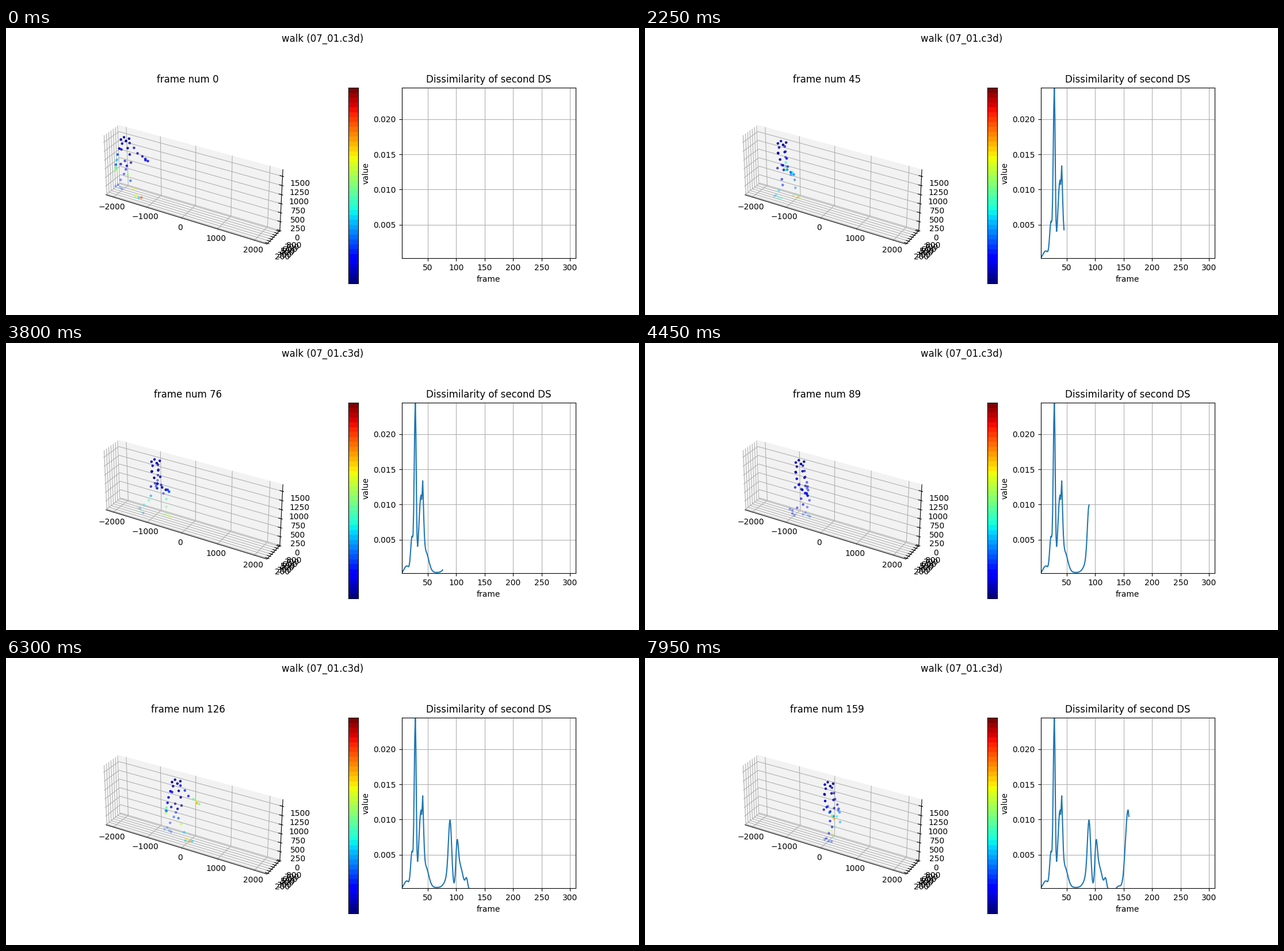
Animation of 1100 by 500 pixels, one loop 8000 ms. Source, as a matplotlib script:

```python
from itertools import product

import numpy as np
import matplotlib.pyplot as plt
from matplotlib.animation import FuncAnimation
from matplotlib.collections import LineCollection, PolyCollection

W, H, DPI = 1100, 500, 100
FRAMES, INTERVAL = 160, 50
PERIOD = 126            # frames per gait cycle
SPEED = 11.35           # mm per frame
JET = plt.get_cmap("jet", 40)

fig = plt.figure(figsize=(W / DPI, H / DPI), dpi=DPI, facecolor="white")


def add_axes(x, y, w, h):
    """Axes placed by its top-left corner and size in pixels."""
    return fig.add_axes([x / W, 1 - (y + h) / H, w / W, h / H])


# ---------- perspective view ----------
CENTER = np.array([51, 500, 843])
HALF = np.array([2280, 345, 843])
SCALE = 0.388e-3
elev, azim = np.radians(30), np.radians(-60)
EYE = np.array([np.cos(elev) * np.cos(azim), np.cos(elev) * np.sin(azim), np.sin(elev)])
RIGHT = np.array([-np.sin(azim), np.cos(azim), 0])
UP = np.cross(EYE, RIGHT)


def project(points):
    """World millimetres to stage pixels, plus nearness to the viewer."""
    b = (np.asarray(points, float) - CENTER) * SCALE
    near = b @ EYE
    k = 1843 / (10 - near)
    return np.stack([320.5 + k * (b @ RIGHT), 269.4 - k * (b @ UP)], -1), near


def path(*points):
    return project(points)[0]


view = add_axes(0, 0, W, H)
view.set(xlim=(0, W), ylim=(H, 0))
view.axis("off")

(x0, y0, z0), (x1, y1, z1) = CENTER - HALF, CENTER + HALF
panes = [
    path((x0, y0, z0), (x0, y1, z0), (x0, y1, z1), (x0, y0, z1)),
    path((x0, y1, z0), (x1, y1, z0), (x1, y1, z1), (x0, y1, z1)),
    path((x0, y0, z0), (x1, y0, z0), (x1, y1, z0), (x0, y1, z0)),
]
view.add_collection(PolyCollection(
    panes, facecolors=["0.975", "0.95", "0.9625"], edgecolors="none", zorder=1))

xticks = range(-2000, 2001, 1000)
yticks = range(200, 801, 100)
zticks = range(0, 1501, 250)
grid = [path((v, y0, z0), (v, y1, z0), (v, y1, z1)) for v in xticks]
grid += [path((x1, v, z0), (x0, v, z0), (x0, v, z1)) for v in yticks]
grid += [path((x0, y0, v), (x0, y1, v), (x1, y1, v)) for v in zticks]
view.add_collection(LineCollection(grid, colors="#b0b0b0", linewidths=0.8, zorder=2))

tx, ty = HALF[0] / 6, HALF[1] / 6
black = [path((x0, y0, z0), (x1, y0, z0), (x1, y1, z0), (x1, y1, z1))]
black += [path((v, y0 + 0.2 * ty, z0), (v, y0 - 0.1 * ty, z0)) for v in xticks]
black += [path((x1 - 0.2 * tx, v, z0), (x1 + 0.1 * tx, v, z0)) for v in yticks]
black += [path((x1 - 0.2 * tx, y1, v), (x1 + 0.1 * tx, y1, v)) for v in zticks]
view.add_collection(LineCollection(black, colors="black", linewidths=0.8, zorder=3))


def tick_labels(values, place, dx, dy):
    for v in values:
        px, py = path(place(v))[0]
        view.text(px + dx, py + dy, str(v).replace("-", "\u2212"),
                  ha="center", va="center", fontsize=10)


tick_labels(xticks, lambda v: (v, y0, z0), -2.5, 17)
tick_labels(yticks, lambda v: (x1, v, z0), 25.5, 24.5)
tick_labels(zticks, lambda v: (x1, y1, v), 30, 13)

fig.suptitle("walk (07_01.c3d)")
title = view.text(316.1, 94.9, "", ha="center", va="baseline", fontsize=12)
dots = view.scatter([], [], s=10.5, linewidths=0, zorder=4)

# ---------- walking figure ----------
HEAD = list(product((75, -75), (70, -70), (1557,)))
CHEST = [(-90, 0, 1407), (70, 0, 1322), (-120, 0, 1235), (125, 0, 1157)]
PELVIS = list(product((90, -90), (95, -95), (870,)))
TRUNK = np.array(HEAD + CHEST + PELVIS)


def swing(angle):
    """Unit vector hanging down, swung forward by an angle in degrees."""
    a = np.radians(angle)
    return np.array([np.sin(a), 0, -np.cos(a)])


def pulse(phase, at, width):
    """Smooth bump that repeats once per gait cycle."""
    d = (phase - at + PERIOD / 2) % PERIOD - PERIOD / 2
    return np.exp(-0.5 * (d / width) ** 2)


def arm(side, t):
    c = side * np.cos(2 * np.pi * t / PERIOD)
    upper, fore = 325 * swing(13.5 + 24.5 * c), 300 * swing(29 + 42 * c)
    shoulder = np.array([-22 + 32 * c, side * 185, 1364])
    out = np.array([0, side * 40, 0])
    elbow = shoulder + upper + out
    return [shoulder, shoulder + 0.5 * upper + out, elbow, elbow + 0.5 * fore,
            elbow + 0.85 * fore - 0.5 * out, elbow + 0.95 * fore - 1.5 * out,
            elbow + 1.15 * fore - out]


def bend_knee(hip, ankle, thigh=405, shank=410):
    d = ankle - hip
    reach = np.linalg.norm(d)
    d = d / reach
    reach = min(reach, thigh + shank - 1)
    m = (thigh ** 2 - shank ** 2 + reach ** 2) / (2 * reach)
    bend = np.sqrt(max(0, thigh ** 2 - m ** 2))
    return hip + m * d + bend * np.array([-d[2], 0, d[0]])


def leg(side, t):
    phase = (t if side < 0 else t + PERIOD / 2) % PERIOD
    s = np.clip((phase - 72) / 50, 0, 1)
    stride = SPEED * PERIOD * s * s * (3 - 2 * s)
    pitch = 50 * pulse(phase, 86, 11) - 14 * pulse(phase, 123, 7)
    along, normal = swing(90 - pitch) * [1, 1, -1], -swing(-pitch)
    along[2] = -np.sin(np.radians(pitch))
    lift = 35 * np.sin(np.pi * s) + 195 * max(0, along[2])
    toe = np.array([500 - SPEED * phase + stride, side * 95, 25 + lift])
    heel = toe - 195 * along
    ankle = heel + 60 * along + 60 * normal
    hip = np.array([10, side * 95, 840])
    knee = bend_knee(hip, ankle)
    out = np.array([0, side * 20, 0])
    return [hip + 0.6 * (knee - hip) + out, knee + out,
            ankle + 0.45 * (knee - ankle) + out, ankle + out,
            heel, toe - 68 * along + out, toe]


def pose(t):
    p = np.vstack([TRUNK, arm(1, t), arm(-1, t), leg(1, t), leg(-1, t)])
    bob = 12 * (1 - np.cos(4 * np.pi * t / PERIOD))
    return p + np.array([-1810 + SPEED * t, 489 + 0.55 * t, bob])


# ---------- marker values: calm trunk, limbs livelier towards their ends ----------
ARM_GAIN, LEG_GAIN = np.linspace(0.15, 1.1, 7), np.linspace(0.7, 1.1, 7)
LIMBS = [(ARM_GAIN, 45, 81), (ARM_GAIN, 138, 126), (LEG_GAIN, 50, 126), (LEG_GAIN, 0, 63)]
COUNT = len(TRUNK) + 28
rng = np.random.default_rng(7)
SHIFT = rng.uniform(0, 2 * np.pi, COUNT)
RATE = rng.uniform(0.1, 0.3, COUNT)


def values(t):
    parts = [np.full(len(TRUNK), 0.05)]
    for gain, peak, period in LIMBS:
        parts.append(gain * (0.34 + 0.2 * np.cos(2 * np.pi * (t - peak) / period)))
    return np.clip(np.concatenate(parts) * (1 + 0.45 * np.sin(SHIFT + RATE * t)), 0, 1)


# ---------- colour bar ----------
bar = add_axes(595.3, 104, 17.05, 341)
bar.pcolormesh([0, 1], np.linspace(0, 1, JET.N + 1), np.arange(JET.N)[:, None], cmap=JET)
bar.set(xticks=[], yticks=[])

# ---------- dissimilarity chart ----------
# each bump: centre, height, width before and after the centre
BUMPS = [(13, 1.2, 5, 4), (22, 5, 2.3, 1.6), (28, 24, 2, 1.5), (38, 11, 3.8, 2.2),
         (41, 8, 0.8, 2), (46, 3, 3, 5.4), (89, 7.5, 2.8, 2.9), (89, 2.2, 7, 2.9),
         (101.5, 6.6, 2.2, 2.5), (107.5, 3, 3, 4.5), (118, 1.5, 2.2, 2),
         (141, 0.45, 3, 4), (157.6, 11.2, 4.6, 3.3)]
steps = np.arange(4, FRAMES)
curve = 0.2 + 0.15 * np.cos(2 * np.pi * (steps - 62) / PERIOD)
for at, height, rise, fall in BUMPS:
    width = np.where(steps < at, rise, fall)
    curve += height * np.exp(-0.5 * ((steps - at) / width) ** 2)
curve /= 1000

chart = add_axes(687.6, 103.6, 302.4, 297.8)
chart.set(xlim=(4, 310), ylim=(0.00022, 0.0245), xlabel="frame", ylabel="value",
          xticks=range(50, 301, 50), yticks=[0.005, 0.010, 0.015, 0.020])
chart.set_title("Dissimilarity of second DS")
chart.grid(True)
line, = chart.plot([], [], color="#1f77b4", linewidth=1.5)


def draw(t):
    xy, near = project(pose(t))
    rgba = JET(values(t))
    rgba[:, 3] = 0.3 + 0.7 * (near - near.min()) / np.ptp(near)
    order = np.argsort(near)
    dots.set_offsets(xy[order])
    dots.set_facecolors(rgba[order])
    title.set_text(f"frame num {t}")
    shown = steps <= t
    line.set_data(steps[shown], curve[shown])
    return dots, title, line


anim = FuncAnimation(fig, draw, frames=FRAMES, interval=INTERVAL, repeat=True, repeat_delay=0)
plt.show()
```
